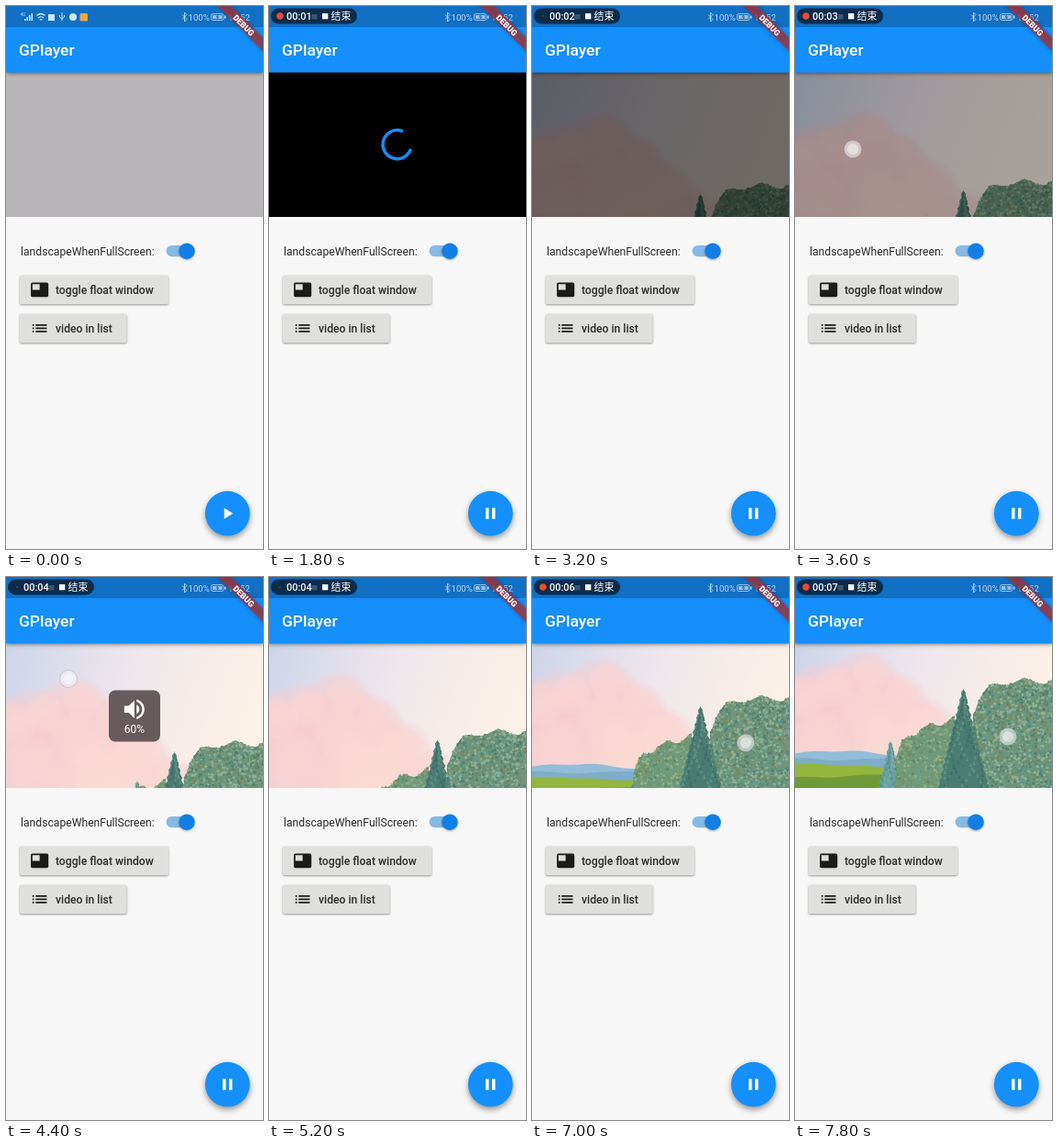
Recreate the animation shown at these times as an HTML page with a canvas. Size 280 px wide and 592 px high, loop 8000 ms.

```html
<!DOCTYPE html>
<html lang="en">
<head>
<meta charset="utf-8">
<title>Player demo</title>
<style>
  html, body { margin: 0; width: 100%; height: 100%; overflow: hidden; background: #f7f7f7; }
  canvas, svg { position: absolute; left: 0; display: block; }
  canvas { top: 72px; }
  svg { top: 0; font-family: Roboto, "Noto Sans CJK SC", "Noto Sans CJK", sans-serif; }
  .label { font-size: 12.17px; fill: #2b2b2b; }
  .button { fill: #dfdfdd; filter: drop-shadow(0 1.5px 1.2px #0006); }
</style>
</head>
<body>
<canvas id="video" width="280" height="158"></canvas>
<svg width="280" height="592" viewBox="0 0 280 592">
  <g id="spinner">
    <path id="arc" fill="none" stroke="#1a8cf2" stroke-width="3.5" stroke-linecap="square"/>
  </g>
  <g id="volume">
    <rect x="112" y="123.5" width="56" height="56" rx="7" fill="#5d5053" opacity=".92"/>
    <path transform="translate(125.2 129.6) scale(1.22)" fill="#fff" d="M3 9v6h4l5 5V4L7 9H3zm13.5 3c0-1.77-1.02-3.29-2.5-4.03v8.05c1.48-.73 2.5-2.25 2.5-4.02zM14 3.23v2.06c2.89.86 5 3.54 5 6.71s-2.11 5.85-5 6.71v2.06c4.01-.91 7-4.49 7-8.77s-2.99-7.86-7-8.77z"/>
    <text id="level" x="140" y="170" font-size="12" fill="#fff" text-anchor="middle"></text>
  </g>
  <g id="touch">
    <circle r="9.5" fill="#f2f2f4" fill-opacity=".6" stroke="#999" stroke-opacity=".4"/>
    <circle r="6" fill="#fff" fill-opacity=".4"/>
  </g>

  <!-- app bar and status bar -->
  <rect width="280" height="72.5" fill="#148ffb" style="filter:drop-shadow(0 1.5px 2px #0007)"/>
  <rect width="280" height="23" fill="#116fc4"/>
  <text x="14" y="54" font-size="17.4" font-weight="500" fill="#fff">GPlayer</text>
  <g id="icons" fill="#d5e6f6">
    <text x="15.5" y="10.5" font-size="4.5">4G</text>
    <path d="M20 16v-2h1.5v2zm2.5 0v-4h1.500v4zm2.500 0v-6h1.500v6zm2.500 0v-8h1.500v8z"/>
    <path d="M33.5 10.5q4.5-4 9 0M35 13q3-2.5 6 0M36.700 15.200q1.300-1 2.600 0" fill="none" stroke="#d5e6f6" stroke-width="1.2"/>
    <rect x="46" y="9" width="7" height="7"/>
    <path d="M61 7v9M58.5 10v2l2.5 2 2.500-2v-2" fill="none" stroke="#d5e6f6"/>
    <circle cx="73" cy="12" r="4"/>
    <rect x="80.5" y="8" width="8.5" height="8.5" rx="1.5" fill="#f0a63c"/>
  </g>
  <g fill="#bcd7f0" font-size="9.6">
    <path d="M192 9.500l5 5-2.500 2.500V7l2.500 2.500-5 5" fill="none" stroke="#bcd7f0" stroke-width=".9"/>
    <text x="198.5" y="15.5">100%</text>
    <rect x="223.5" y="8.500" width="13.5" height="7" rx="2" fill="none" stroke="#bcd7f0" stroke-opacity=".8"/>
    <rect x="225" y="10" width="10.5" height="4" opacity=".8"/>
    <rect x="238" y="10.5" width="1.5" height="3"/>
    <path d="M231 8l-2.500 4.500h2L229 16l3.500-4.500h-2z" fill="#116fc4"/>
    <text x="242" y="15.5">12:52</text>
  </g>
  <g id="pill">
    <rect x="2" y="2.5" width="94" height="17" rx="8.5" fill="#0b2c4b"/>
    <circle id="dot" cx="12" cy="11" fill="#ee4a32"/>
    <rect x="46.5" y="9" width="6" height="5.5" fill="#3d5670"/>
    <rect x="58" y="8" width="6.3" height="6.3" fill="#fff"/>
    <g fill="#fff" font-size="10.9" font-weight="500">
      <text id="clock" x="19" y="15"></text>
      <text x="67.5" y="15">结束</text>
    </g>
  </g>
  <g transform="translate(280) rotate(45)">
    <rect x="-45" y="24.4" width="90" height="10.4" fill="#a5343a" fill-opacity=".78" style="filter:drop-shadow(0 0 2px #0005)"/>
    <text y="32.8" font-size="8.9" font-weight="900" fill="#fff" text-anchor="middle">DEBUG</text>
  </g>

  <!-- settings -->
  <text class="label" x="16" y="271.5">landscapeWhenFullScreen:</text>
  <rect x="174.5" y="261" width="29" height="12.2" rx="6.1" fill="#86b9e4"/>
  <circle cx="197" cy="267.2" r="8.7" fill="#117fe6" style="filter:drop-shadow(0 1px 1px #0005)"/>
  <rect class="button" x="15" y="293.7" width="162" height="31.3" rx="1.7"/>
  <path transform="translate(26.2 299) scale(.87)" fill="#1b1b1b" d="M21 3H3c-1.1 0-2 .9-2 2v14c0 1.1.9 2 2 2h18c1.1 0 2-.9 2-2V5c0-1.1-.9-2-2-2zm-9 9H3V5h9v7z"/>
  <text class="label" x="54" y="313.5" font-weight="500">toggle float window</text>
  <rect class="button" x="15" y="335.7" width="116.5" height="31.3" rx="1.7"/>
  <path transform="translate(26.2 341) scale(.87)" fill="#1b1b1b" d="M3 13h2v-2H3zm0 4h2v-2H3zm0-8h2V7H3zm4 4h14v-2H7zm0 4h14v-2H7zM7 7v2h14V7z"/>
  <text class="label" x="54" y="355.5" font-weight="500">video in list</text>

  <circle cx="241.3" cy="553.2" r="24.4" fill="#148ffb" style="filter:drop-shadow(0 3px 3px #0006)"/>
  <path id="action" transform="translate(230.8 542.8) scale(.87)" fill="#fff"/>
</svg>
<script>
const LOOP = 8000, STEP = 200, PLAY = 1200, FADE = 2400;
const $ = id => document.getElementById(id);
const ctx = $('video').getContext('2d');
const clamp = v => Math.max(0, Math.min(1, v));
const lerp = (a, b, k) => a + (b - a) * clamp(k);
const ease = k => { k = clamp(k); return k * k * (3 - 2 * k); };
const show = (id, on) => $(id).setAttribute('visibility', on ? 'visible' : 'hidden');

let seed = 7;
const random = () => (seed = seed * 16807 % 2147483647) / 2147483647;

// A bush is an outline plus leaves, all in scene coordinates.
function makeBush(x0, x1, top, base, colors, count) {
  const leaves = Array.from({ length: count }, () => {
    const k = random();
    return {
      x: lerp(x0, x1, k), y: top(k) + 130 * random() ** 1.3,
      r: 0.6 + 1.2 * random(), color: colors[Math.floor(random() * colors.length)]
    };
  });
  return { x0, x1, top, base, leaves };
}
const rightBush = makeBush(194, 284, k => 200 + 35 * (1 - k) ** 7 - 3 * Math.cos(k * 15 - 3),
  '#6c967f', ['#88b09b', '#5c8a78', '#94ae8d', '#7b8a62', '#527f72'], 1800);
const leftBush = makeBush(110, 174, k => 262 - 22 * k + 22 * (1 - k) ** 8 - 3 * Math.sin(k * 14),
  '#6f9a7c', ['#8bb08b', '#5d8a70', '#93ad7c', '#7b8f62'], 600);

function fillPath(points, color) {
  ctx.fillStyle = color;
  ctx.beginPath();
  points.forEach(([x, y]) => ctx.lineTo(x, y));
  ctx.fill();
}

function drawBush({ x0, x1, top, base, leaves }, rise) {
  const edge = Array.from({ length: 31 }, (_, i) => [lerp(x0, x1, i / 30), top(i / 30) - rise]);
  fillPath([[x0, 400], ...edge, [x1, 400]], base);
  for (const { x, y, r, color } of leaves) {
    ctx.fillStyle = color;
    ctx.beginPath();
    ctx.arc(x, y - rise, r, 0, 7);
    ctx.fill();
  }
}

function drawFir(x, y, slope, colors) {
  const side = (dir, h) => [x + dir * (h * slope + (h % 8 ? 1.5 : -0.5)), y + h];
  const half = dir => Array.from({ length: 36 }, (_, i) => side(dir, i * 4));
  fillPath([[x, y], ...half(1), ...half(-1).reverse()], colors[0]);
  for (let h = 5; h < 140; h++) {
    const offset = Math.sin(h * 7.3) * h * slope * 0.9;
    fillPath([[x + offset, y + h - 3], [x + offset + 1.8, y + h + 2], [x + offset - 1.5, y + h + 2]],
      colors[1 + h % 2]);
  }
}

function drawHill(y, height, phase, color) {
  const edge = Array.from({ length: 29 }, (_, i) =>
    [i * 10, y - height * (Math.sin(i * 0.34 + phase) + 0.3 * Math.sin(i * 1.1))]);
  fillPath([[0, 400], ...edge, [280, 400]], color);
}

function puff(x, y, r, color) {
  const g = ctx.createRadialGradient(x, y, r * 0.2, x, y, r);
  g.addColorStop(0, color + 'c0');
  g.addColorStop(0.75, color + '70');
  g.addColorStop(1, color + '00');
  ctx.fillStyle = g;
  ctx.fillRect(x - r, y - r, 2 * r, 2 * r);
}

function drawSky(rise) {
  const g = ctx.createLinearGradient(0, 72, 260, 170);
  g.addColorStop(0, '#ccd4ea');
  g.addColorStop(0.5, '#efe6ec');
  g.addColorStop(1, '#fcf1e6');
  ctx.fillStyle = g;
  ctx.fillRect(0, 72, 280, 158);
  const drift = rise * 0.42;
  const cloud = [[75, 158, 44], [35, 172, 46], [108, 180, 42], [2, 185, 50], [70, 205, 62],
    [135, 215, 50], [20, 240, 70], [100, 255, 75], [175, 255, 55]];
  cloud.forEach(([x, y, r]) => puff(x, y - drift, r, '#f8cbce'));
  cloud.forEach(([x, y, r]) => puff(x + 8, y - drift - r * 0.35, r * 0.5, '#fad6d3'));
  puff(120, 245 - drift, 75, '#fadcd3');
}

function drawVideo(t) {
  ctx.setTransform(1, 0, 0, 1, 0, -72);
  if (t < FADE) {
    ctx.fillStyle = t < PLAY ? '#b8b6b8' : '#000';
    ctx.fillRect(0, 72, 280, 158);
    return;
  }
  const rise = 86 * Math.max(0, (t - 2600) / 5200) ** 1.5;
  drawSky(rise);
  const horizon = 257 - rise * 0.75;
  drawHill(horizon, 3, 0, '#92bcd8');
  drawHill(horizon + 5, 2, 3, '#7fadc8');
  drawHill(horizon + 13, 1.5, 1, '#94b63f');
  drawHill(horizon + 24, 2, 4, '#6f9a38');
  drawFir(lerp(143, 104, (t - 6000) / 1800), 233 - rise * 0.63, 0.24, ['#6a9fa0', '#5a8f94', '#7bada8']);
  drawBush(leftBush, rise);
  drawBush(rightBush, rise);
  drawFir(183.5, 208 - rise, 0.25, ['#4b7c72', '#3f6f68', '#5f8f80']);
  ctx.fillStyle = `rgba(0,0,0,${clamp(1 - (t - FADE) / 1800)})`;
  ctx.fillRect(0, 72, 280, 158);
}

function drawSpinner(t) {
  const p = (t - PLAY) / 1333 % 1;
  const head = ease(p * 2), tail = ease(p * 2 - 1);
  const start = 25 + (t - 1800) * 0.108 + tail * 270;
  const sweep = Math.max(1, (head - tail) * 270);
  const point = deg => {
    const a = deg * Math.PI / 180;
    return `${139.7 + 15.6 * Math.cos(a)} ${151 + 15.6 * Math.sin(a)}`;
  };
  $('arc').setAttribute('d', `M${point(start)}A15.6 15.6 0 ${sweep > 180 ? 1 : 0} 1 ${point(start + sweep)}`);
}

function drawControls(t) {
  const recording = t >= 400;
  show('pill', recording);
  show('icons', !recording);
  $('clock').textContent = '00:0' + Math.max(0, Math.floor((t - 400) / 1000));
  $('dot').setAttribute('r', t % 1000 >= 200 && t % 1000 < 600 ? 0.7 : 3.7);
  $('action').setAttribute('d', t < PLAY ? 'M8 5v14l11-7z' : 'M6 19h4V5H6zm8-14v14h4V5z');

  show('spinner', t >= PLAY && t < FADE);
  drawSpinner(Math.max(t, PLAY));

  const drag = (t - 3600) / 800;
  show('volume', t >= 3800 && t < 5000);
  $('level').textContent = Math.round(lerp(32, 60, drag)) + '%';

  const left = t < 5000;
  const slide = (t - 6000) / 1800;
  show('touch', t >= 3600 && t < 4800 || t >= 6000);
  const x = left ? lerp(63, 68, drag) : lerp(234, 232, slide);
  const y = left ? lerp(156, 111, drag) : lerp(189, 174, slide);
  $('touch').setAttribute('transform', `translate(${x} ${y})`);
}

let shown = -1;
function tick() {
  const t = Math.floor(performance.now() % LOOP / STEP) * STEP;
  if (t !== shown) {
    shown = t;
    drawVideo(t);
    drawControls(t);
  }
  requestAnimationFrame(tick);
}
tick();
</script>
</body>
</html>
```
